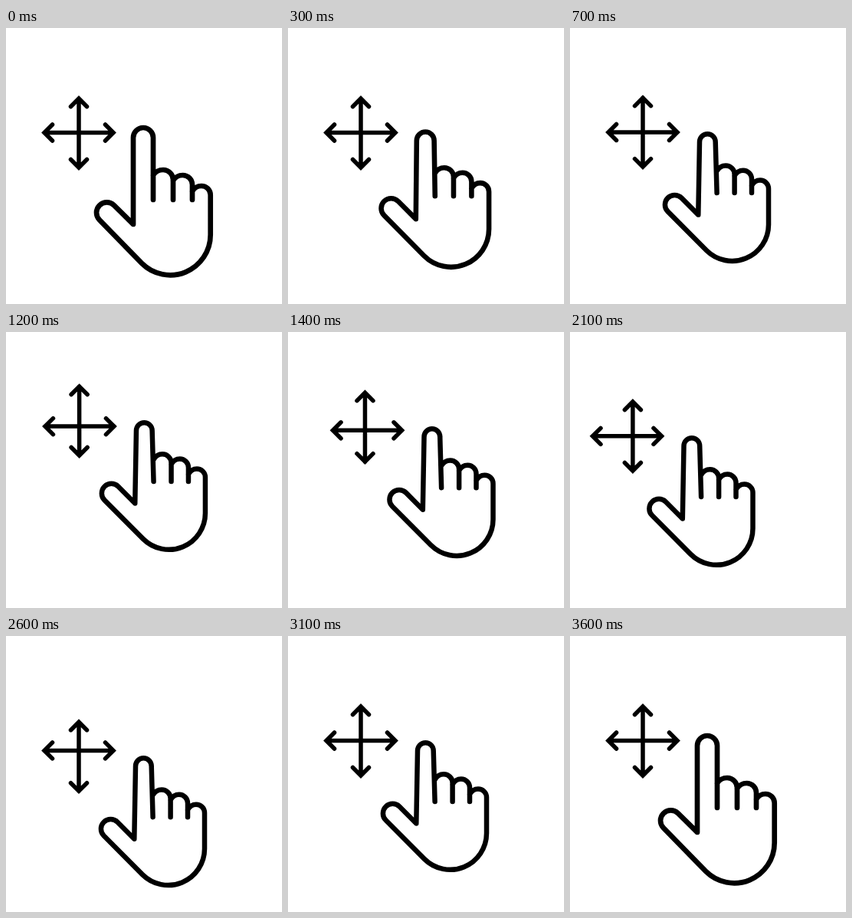
These frames come from a looping animation (360x360 px, 3.7 s). An HTML page:

```html
<!DOCTYPE html>
<html lang="en">
<head>
<meta charset="utf-8">
<title>Drag in any direction</title>
<style>
  html, body { margin: 0; width: 100%; height: 100%; overflow: hidden; background: #fff; }
  svg { display: block; width: 100vw; height: 100vh; }
  path { fill: none; stroke: #000; stroke-linecap: round; }
  .arrow { stroke-width: 5.5; stroke-linejoin: miter; }
  #hand { stroke-linejoin: round; }
</style>
</head>
<body>
<svg viewBox="0 0 360 360">
  <path id="across" class="arrow" d="M50 136.5H140M60.5 126L50 136.5L60.5 147M129.5 126L140 136.5L129.5 147"/>
  <path id="upright" class="arrow" d="M95 92V182M84.5 102.5L95 92L105.5 102.5M84.5 171.5L95 182L105.5 171.5"/>
  <path id="hand"/>
</svg>
<script>
const LOOP = 3700, STEP = 100;
const LAG = 0.64; // how far each arrow follows sideways to its own axis

// time, x, y
const travel = [
  [0, 0, 0], [680, 0, 0], [1175, 0, -22], [1690, 19.5, -1],
  [2100, -20.5, -1], [2600, 0, 20.2], [3100, 0, 0], [LOOP, 0, 0]
];
// time, amount pressed
const press = [[0, 0], [500, 1], [3100, 1], [3600, 0], [LOOP, 0]];

const open = {
  stroke: 6.7, crotch: [166, 256], tip: [166, 192, 143], knuckles: [192, 218, 243, 266.7],
  tops: [185, 192, 206], ends: 224, palm: [214.2, 269.8, 52.5], thumb: [131.5, 240.8, 13.5]
};
const pressed = {
  stroke: 6.5, crotch: [167.3, 244.5], tip: [169, 189.7, 149.5], knuckles: [191.6, 214.6, 237, 259],
  tops: [180.3, 186.6, 199.5], ends: 216, palm: [211.5, 257.3, 47.5], thumb: [136.5, 231.4, 12.6]
};

const mix = (a, b, k) => Array.isArray(a) ? a.map((v, i) => mix(v, b[i], k)) : a + (b - a) * k;

function sample(keys, t) {
  const i = keys.findIndex((key, n) => n > 0 && t <= key[0]);
  const a = keys[i - 1], b = keys[i];
  return mix(a, b, (t - a[0]) / (b[0] - a[0])).slice(1);
}

function handPath(s) {
  const [left, right, y] = s.tip, r = (right - left) / 2;
  const [px, py, pr] = s.palm, [tx, ty, tr] = s.thumb;
  const d = Math.SQRT1_2, x = s.knuckles;
  let path = `M${x[0]} ${s.ends}L${right} ${y}A${r} ${r} 0 0 0 ${left} ${y}L${s.crotch}`
    + `L${tx + tr * d} ${ty - tr * d}A${tr} ${tr} 0 0 0 ${tx - tr * d} ${ty + tr * d}`
    + `L${px - pr * d} ${py + pr * d}A${pr} ${pr} 0 0 0 ${x[3]} ${py}`;
  s.tops.forEach((top, i) => {
    const w = (x[i + 1] - x[i]) / 2;
    path += `M${x[i]} ${top + 7}Q${x[i] + w * 0.35} ${top} ${x[i] + w} ${top}`
      + `A${w} ${w} 0 0 1 ${x[i + 1]} ${top + w}V${i < 2 ? s.ends : py}`;
  });
  return path + `M${x[2]} ${s.tops[2] + 7}V${s.ends}`;
}

const [across, upright, hand] = ["across", "upright", "hand"].map(id => document.getElementById(id));
const move = (el, x, y) => el.setAttribute("transform", `translate(${x} ${y})`);

function draw(now) {
  const t = Math.floor((now % LOOP) / STEP) * STEP;
  const [x, y] = sample(travel, t), [k] = sample(press, t);
  const shape = {};
  for (const part in open) shape[part] = mix(open[part], pressed[part], k);
  hand.setAttribute("d", handPath(shape));
  hand.setAttribute("stroke-width", shape.stroke);
  move(hand, x, y);
  move(across, x, y * LAG);
  move(upright, x * LAG, y);
}

const start = performance.now();
function tick() {
  draw(performance.now() - start);
  requestAnimationFrame(tick);
}
tick();
</script>
</body>
</html>
```
